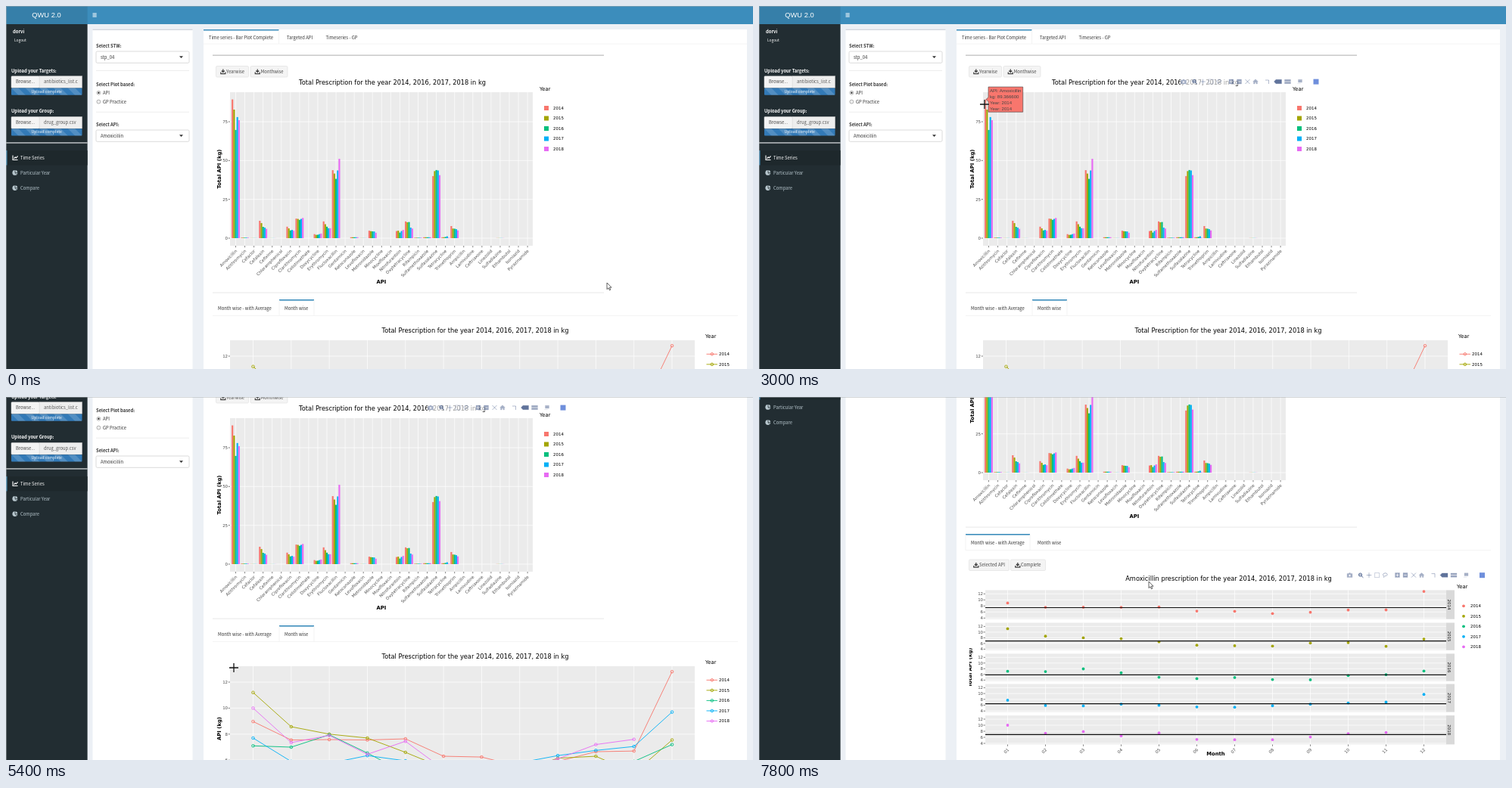
Recreate the animation shown at these times as an HTML page. Size 987x480 px, loop 8000 ms.

```html
<!DOCTYPE html>
<html lang="en">
<head>
<meta charset="utf-8">
<title>Prescription dashboard</title>
<style>
  html, body { margin: 0; width: 100%; height: 100%; overflow: hidden; background: #ecf0f5; }
  svg { display: block; width: 987px; height: 480px; }
  text { font-family: "Noto Sans CJK SC", "Noto Sans CJK JP", "Noto Sans CJK", Lato, sans-serif; white-space: pre; }
  .plot text { font-family: "DejaVu Sans", sans-serif; }
  .arial, .tip text { font-family: "Liberation Sans", sans-serif; }
</style>
</head>
<body>
<svg id="stage" viewBox="0 0 987 480"></svg>
<script>
const stage = document.getElementById('stage');
const YEARS = [2014, 2015, 2016, 2017, 2018];
const COLORS = ['#f8766d', '#a3a500', '#00bf7d', '#00b0f6', '#e76bf3'];
const UI = 5.85, TICK = 5.46, AXIS = 6.82, TITLE = 8.25;
const SIDEBAR = 107.6;

function el(parent, tag, attrs = {}, content) {
  const node = document.createElementNS('http://www.w3.org/2000/svg', tag);
  for (const key in attrs) node.setAttribute(key, attrs[key]);
  if (content !== undefined) node.textContent = content;
  return parent.appendChild(node);
}
const group = (parent, attrs) => el(parent, 'g', attrs);
const rect = (p, x, y, width, height, fill, more) => el(p, 'rect', { x, y, width, height, fill, ...more });
const path = (p, d, stroke, width = 1, more) => el(p, 'path', { d, stroke, 'stroke-width': width, fill: 'none', ...more });
const dot = (p, cx, cy, r, fill, more) => el(p, 'circle', { cx, cy, r, fill, ...more });
// y is the middle of the capitals
const label = (p, x, y, str, size = UI, fill = '#333', more) =>
  el(p, 'text', { x, y: y + size * .36, 'font-size': size, fill, ...more }, str);
const turned = (p, x, y, angle, str, size, fill, more) =>
  label(group(p, { transform: `translate(${x} ${y}) rotate(${angle})` }), 0, 0, str, size, fill, more);
const BOLD = { 'font-weight': 700 }, MID = { 'text-anchor': 'middle' }, END = { 'text-anchor': 'end' };
const BOLD_MID = { ...BOLD, ...MID };

const defs = el(stage, 'defs');
const TILE = 18.7, PERIOD = TILE / Math.SQRT2;
const stripes = el(defs, 'pattern', { id: 'stripes', width: PERIOD, height: PERIOD, patternUnits: 'userSpaceOnUse', patternTransform: 'rotate(-45)' });
rect(stripes, 0, 0, PERIOD, PERIOD, '#337ab7');
rect(stripes, 0, 0, PERIOD / 2, PERIOD, '#528ec2');
rect(el(defs, 'clipPath', { id: 'axisClip' }), 277.8, 440, 20, 240);

rect(stage, 0, 0, 987, 480, '#ecf0f5');
rect(stage, 0, 0, SIDEBAR, 480, '#222d32');
const page = group(stage);

// Header and navigation
rect(page, 0, 0, 987, 24, '#3c8dbc');
rect(page, 0, 0, SIDEBAR, 24, '#367fa9');
label(page, 53.5, 12, 'QWU 2.0', 9.34, '#fff', { ...MID, class: 'arial' });
path(page, 'M114.5 10h5.2M114.5 12h5.2M114.5 14h5.2', '#fff');
label(page, 9, 34, 'dorvi', UI, '#fff', BOLD);
label(page, 11, 45, 'Logout', 4.85, '#fff');

function upload(y, title, file) {
  label(page, 7, y, title, UI, '#fff', BOLD);
  rect(page, 44, y + 7.2, 56.5, 15.6, '#eee', { stroke: '#ccc', 'stroke-width': .5 });
  rect(page, 7, y + 7.2, 37, 15.6, '#f4f4f4', { stroke: '#ddd', 'stroke-width': .5, rx: 1 });
  label(page, 13, y + 14.8, 'Browse...', UI, '#444');
  label(page, 50, y + 14.8, file, UI, '#555');
  const bar = group(page, { transform: `translate(7 ${y + 23 + TILE})` });
  rect(bar, 0, -TILE, 93.5, 9.2, 'url(#stripes)', { rx: 1 });
  label(page, 53.7, y + 27.3, 'Upload complete', 5.05, '#fff', MID);
}
upload(85.5, 'Upload your Targets:', 'antibiotics_list.c');
upload(139.2, 'Upload your Group:', 'drug_group.csv');
rect(page, 0, 180.4, SIDEBAR, 1.1, '#f4f6f7');

rect(page, 0, 191, SIDEBAR, 19.5, '#1e282c');
rect(page, 0, 191, 1.5, 19.5, '#3c8dbc');
path(page, 'M9 197.5v6h6.5M10.5 201.8l1.7-2 1.3 1.2 2-2.6', '#fff', 1.1);
label(page, 19, 200.6, 'Time Series', UI, '#fff');
['Particular Year', 'Compare'].forEach((name, i) => {
  const y = 220.4 + i * 20.2;
  dot(page, 11.8, y, 3.4, '#b8c7ce');
  path(page, `M12 ${y - 3.6}v3.6h3.8M12 ${y}l2.2 2.4`, '#222d32', .7);
  label(page, 19, y, name, UI, '#b8c7ce');
});

// Filter panel
rect(page, 114.5, 30.5, 132, 900, '#fff');
rect(page, 114.5, 30.5, 132, 1.5, '#d2d6de');
function select(y, title, value) {
  label(page, 119, y, title, UI, '#333', BOLD);
  rect(page, 119, y + 7, 123, 15.3, '#fff', { stroke: '#ccc', 'stroke-width': .7, rx: 1.5 });
  label(page, 125, y + 14.6, value);
  el(page, 'path', { d: `M229 ${y + 13.3}h5l-2.5 2.7z`, fill: '#333' });
}
select(53, 'Select STW:', 'stp_04');
select(157, 'Select API:', 'Amoxicillin');
rect(page, 119, 85.2, 123, .7, '#e6e6e6');
rect(page, 119, 139.8, 123, .7, '#e6e6e6');
label(page, 119, 103.5, 'Select Plot based:', UI, '#333', BOLD);
['API', 'GP Practice'].forEach((name, i) => {
  const y = 114.8 + i * 11.8;
  dot(page, 122.4, y, 2.5, i ? '#eee' : '#fff', { stroke: '#888', 'stroke-width': .6 });
  if (!i) dot(page, 122.4, y, 1.2, '#333');
  label(page, 128, y, name);
});

// Content box
rect(page, 261, 31, 718, 900, '#fff');
rect(page, 261, 49.7, 718, .7, '#f0f0f0');
rect(page, 261, 31, 99.5, 1.5, '#3c8dbc');
rect(page, 360, 32, .7, 18, '#eee');
label(page, 268, 41.8, 'Time series - Bar Plot Complete');
label(page, 371, 41.8, 'Targeted API');
label(page, 422.5, 41.8, 'Timeseries - GP');
rect(page, 273, 64.7, 517, .8, '#999');
rect(page, 273, 378.7, 517, .7, '#ddd');

function button(p, x, y, w, name) {
  rect(p, x, y, w, 14.5, '#f4f4f4', { stroke: '#ddd', 'stroke-width': .6, rx: 1.4 });
  path(p, `M${x + 6.3} ${y + 8}v2.2h6v-2.2M${x + 9.3} ${y + 4}v3.5M${x + 7.4} ${y + 6}l1.9 2 1.9-2`, '#444', 1.3);
  label(p, x + 13.6, y + 7.3, name, UI, '#444');
}
button(page, 277.5, 79.5, 43, 'Yearwise');
button(page, 323, 79.5, 49, 'Monthwise');

// Bar chart
const DRUGS = ('Amoxicillin Azithromycin Cefaclor Cefalexin Cefixime Chloramphenicol Ciprofloxacin Clarithromycin ' +
  'Colistimethate Doxycycline Erythromycin Flucloxacillin Gentamicin Ketoconazole Levofloxacin Metronidazole ' +
  'Minocycline Moxifloxacin Nitrofurantoin Oxytetracycline Rifampicin Sulfamethoxazole Sulfasalazine Tetracycline ' +
  'Trimethoprim Ampicillin Lamivudine Ceftriaxone Linezolid Sulfadiazine Ethambutol Isoniazid Pyrazinamide').split(' ');
const same = v => Array(5).fill(v);
const KG = {
  Amoxicillin: [89.37, 82.8, 69.7, 78, 76],
  Azithromycin: same(.35), Cefaclor: same(.08), Cefixime: same(.05),
  Cefalexin: [11.2, 9.7, 7.3, 6.8, 6],
  Ciprofloxacin: [7.4, 6.3, 5, 5.3, 4.8],
  Clarithromycin: [12.6, 12.4, 11.8, 12.4, 13],
  Doxycycline: [2.6, 2.1, 2.2, 2.6, 3],
  Erythromycin: [10.8, 9, 7.4, 6.4, 6.4],
  Flucloxacillin: [43.8, 41.6, 38.2, 43.6, 51.1],
  Ketoconazole: same(.6), Levofloxacin: same(.08),
  Metronidazole: [4.8, 4.5, 4.4, 4.3, 3.5],
  Nitrofurantoin: [4.6, 4.8, 3.6, 4.6, 5.3],
  Oxytetracycline: [10.8, 10.2, 10.4, 6.8, 6.2],
  Rifampicin: same(.3), Sulfamethoxazole: same(.6), Sulfadiazine: same(.08),
  Sulfasalazine: [40, 43.2, 43.9, 43.6, 40.6],
  Tetracycline: [.6, .6, .8, 1.2, .3],
  Trimethoprim: [7.8, 6.2, 6.1, 5.8, 5]
};

function yTick(p, x, y, value, right) {
  path(p, `M${x} ${y}H${right}`, '#fff', .7);
  path(p, `M${x - 2.3} ${y}H${x}`, '#333', .6);
  label(p, x - 2.9, y, value, TICK, '#4d4d4d', END);
}
function xTick(p, x, y, name) {
  path(p, `M${x} ${y}v2.3`, '#333', .6);
  turned(p, x + .7, y + 6, -45, name, TICK, '#4d4d4d', END);
}

const bars = group(page, { class: 'plot' });
rect(bars, 296, 114, 400, 203, '#ebebeb');
const drugX = i => 303.5 + i * 12.05;
const kgY = v => 307 - v * 2.053;
[0, 25, 50, 75].forEach(v => yTick(bars, 296, kgY(v), v, 696));
DRUGS.forEach((name, i) => {
  const x = drugX(i);
  path(bars, `M${x} 114V317`, '#fff', .7);
  xTick(bars, x, 317, name);
  (KG[name] || []).forEach((v, k) => rect(bars, x - 5.4 + k * 2.17, kgY(v), 2.17, v * 2.053, COLORS[k]));
});
label(bars, 510.5, 101, 'Total Prescription for the year 2014, 2016, 2017, 2018 in kg', TITLE, '#000', MID);
label(bars, 496, 365, 'API', AXIS, '#000', BOLD_MID);
turned(bars, 281.8, 215.5, -90, 'Total API (kg)', AXIS, '#000', BOLD_MID);
label(bars, 705, 109.5, 'Year', AXIS, '#000');
YEARS.forEach((year, k) => {
  const y = 135 + k * 13.5;
  rect(bars, 711, y - 3, 6, 6, COLORS[k]);
  label(bars, 723, y, year, TICK, '#000');
});

// Toolbar shown over a hovered plot
function toolbar(x, y) {
  const bar = group(page, { transform: `translate(${x} ${y})` });
  rect(bar, -4, -5, 188, 9.5, '#fff', { opacity: .62 });
  const icon = (dx, d, opacity = .32, filled) => path(bar, d, '#001f5f', filled ? .3 : 1, {
    transform: `translate(${dx} 0)`, opacity, 'fill-rule': 'evenodd', ...(filled && { fill: '#001f5f' })
  });
  icon(.5, 'M-3.5-2h2l.7-1h1.6l.7 1h2v5h-7zM1.3.5a1.3 1.3 0 1 0-2.6 0a1.3 1.3 0 1 0 2.6 0', .35, true);
  icon(15, 'M1.6-.5a2.1 2.1 0 1 0-4.2 0a2.1 2.1 0 1 0 4.2 0M1 1l2.4 2.2M-1.8-.5h2.6', .65);
  icon(26, 'M-3.3 0h6.6M0-3.3v6.6');
  icon(36.6, 'M-3-3h6v6h-6z', .4).setAttribute('stroke-dasharray', '1 1');
  icon(47, 'M-1.5 3.3l.5-1.8C-4-.2-2-3 1-2.7S4 1.3-.5 1.2');
  icon(63.5, 'M-3-3h6v6h-6zM-.5-2v1.5h-1.5v1h1.5v1.5h1v-1.5h1.5v-1h-1.5v-1.5z', .4, true);
  icon(74, 'M-3-3h6v6h-6zM-2-.5v1h4v-1z', .4, true);
  icon(85, 'M-3-3l6 6M3-3l-6 6');
  icon(95.5, 'M-3.5 0L0-3.2 3.5 0h-1v3h-1.7v-2h-1.6v2h-1.7v-3z', .35, true);
  icon(111, 'M-2.5-2h4.5v5', .3);
  icon(125, 'M-5 0l2.5-2.7h7.5v5.4h-7.5z', .62, true);
  icon(138, 'M-4-2.7h8v2.2h-8zM-4 .5h8v2.2h-8z', .4, true);
  icon(154, 'M-2-2.8h5v3.8h-5zM-3.2 2.6h4.5', .35, true);
  rect(bar, 172, -3.4, 7, 7, '#6f8fdc');
  return bar;
}
const barsTools = toolbar(560.5, 100);

// Lower tabs
rect(page, 273, 409.3, 694, .7, '#f0f0f0');
const tabMark = rect(page, 361, 388, 46, 1.6, '#3c8dbc');
const tabSides = path(page, '', '#eee', .7);
label(page, 280, 399.5, 'Month wise - with Average');
label(page, 368, 399.5, 'Month wise');

const MONTHS = Array.from({ length: 12 }, (_, m) => String(m + 1).padStart(2, '0'));
const MONTHLY = [
  [8.97, 7.55, 7.58, 7.55, 7.64, 6.3, 6.24, 5.5, 5.9, 6.65, 6.7, 12.8],
  [11.2, 8.57, 8, 7.7, 6.6, 5.4, 5.2, 5.1, 6.15, 6.3, 5, 7.55],
  [7.1, 7, 7.95, 6.55, 5, 4.5, 4.9, 4.2, 4.1, 5.6, 5.9, 7.2],
  [7.7, 5.9, 5.75, 6.35, 5.95, 5.4, 5.3, 5.8, 6.35, 6.75, 7.05, 9.7],
  [10, 7.35, 7.9, 6.45, 7.45, 5.3, 5.2, 5.2, 6.1, 7.2, 7.6]
];
const mean = list => list.reduce((a, b) => a + b) / list.length;

// Line chart by month
const lines = group(page, { class: 'plot' });
rect(lines, 296, 442, 614, 164, '#ebebeb');
const lineX = m => 326.5 + m * 50.32;
const lineY = v => 463 + (12 - v) * 17.2;
MONTHS.forEach((name, m) => {
  path(lines, `M${lineX(m)} 442V606`, '#fff', .7);
  xTick(lines, lineX(m), 606, name);
});
[4, 6, 8, 10, 12].forEach(v => yTick(lines, 296, lineY(v), v, 910));
MONTHLY.forEach((series, k) => {
  const stroke = COLORS[k], ring = { stroke, 'stroke-width': .9 };
  path(lines, 'M' + series.map((v, m) => `${lineX(m)} ${lineY(v)}`).join('L'), stroke, .9);
  series.forEach((v, m) => dot(lines, lineX(m), lineY(v), 1.8, 'none', ring));
  const y = 460.3 + k * 13.55;
  path(lines, `M925.5 ${y}h14.5`, stroke, .9);
  dot(lines, 932.8, y, 1.8, 'none', ring);
  label(lines, 942, y, YEARS[k], TICK, '#000');
});
label(lines, 620, 428.7, 'Total Prescription for the year 2014, 2016, 2017, 2018 in kg', TITLE, '#000', MID);
label(lines, 603, 621, 'Month', AXIS, '#000', BOLD_MID);
turned(lines, 281.8, 524.5, -90, 'API (kg)', AXIS, '#000', BOLD_MID);
label(lines, 924, 437, 'Year', AXIS, '#000');

// One strip per year with its average
const strips = group(page);
button(strips, 277.5, 422, 53, 'Selected API');
button(strips, 332.5, 422, 46, 'Complete');
const facets = group(strips, { class: 'plot' });
const facetX = m => 328.5 + m * 50;
[[467.3, 4], [510.4, 3.75], [551.3, 3.75], [591.4, 3.85], [633, 4]].forEach(([top, unit], k) => {
  const y = v => top + (12 - v) * unit;
  const start = top - 4.9, height = 8 * unit + 6.3;
  rect(facets, 299, start, 609, height, '#ebebeb');
  rect(facets, 908, start, 11, height, '#d9d9d9');
  MONTHS.forEach((_, m) => path(facets, `M${facetX(m)} ${start}v${height}`, '#fff', .7));
  [4, 6, 8, 10, 12].forEach(v => yTick(facets, 299, y(v), v, 908));
  MONTHLY[k].forEach((v, m) => dot(facets, facetX(m), y(v), 1.9, COLORS[k]));
  path(facets, `M299 ${y(mean(MONTHLY[k]))}H908`, '#111', 1.2);
  turned(facets, 912, start + height / 2, 90, YEARS[k], TICK, '#1a1a1a', MID);
  dot(facets, 931, 483.3 + k * 13.5, 1.9, COLORS[k]);
  label(facets, 940, 483.3 + k * 13.5, YEARS[k], TICK, '#000');
});
MONTHS.forEach((name, m) => xTick(facets, facetX(m), 666.5, name));
label(facets, 620.5, 446.7, 'Amoxicillin prescription for the year 2014, 2016, 2017, 2018 in kg', TITLE, '#000', MID);
label(facets, 603.5, 679, 'Month', AXIS, '#000', BOLD_MID);
turned(group(facets, { 'clip-path': 'url(#axisClip)' }), 278.8, 564.5, -90, 'Total API (kg)', AXIS, '#000', BOLD_MID);
label(facets, 922, 457.2, 'Year', AXIS, '#000');
const stripTools = toolbar(780, 442.6);

// Hover label
const tip = group(page, { class: 'tip' });
el(tip, 'path', { d: 'M300 123.5l3-2.8v-13.7h45.7v33.2h-45.7v-13.9z', fill: '#f8766d', stroke: '#444', 'stroke-width': .6 });
['API: Amoxicillin', 'kg: 89.366600', 'Year: 2014', 'Year: 2014'].forEach((row, i) =>
  label(tip, 305, 111.6 + i * 8.1, row, 6.07, '#444'));

// Fixed browser parts
const EDGE = { opacity: .5 };
rect(stage, 0, 0, 987, 1, '#aaafb2', EDGE);
rect(stage, 0, 1, 1, 479, '#aaafb2', EDGE);
const status = group(stage);
rect(status, 0, 475, 330, 6, '#f4f4f4');
label(status, 2, 480.5, 'Waiting for the chart data of the selected month, please hold on for a moment', UI, '#777');

const arrow = el(stage, 'path', { d: 'M0 0v8.6l2-1.8 1.4 3 1.4-.6-1.4-3h2.6z', fill: '#fff', stroke: '#222', 'stroke-width': .7 });
const cross = group(stage);
path(cross, 'M-6.2 0H6.2M0-6.2V6.2', '#fff', 2.4, { opacity: .6 });
path(cross, 'M-6 0H6M0-6V6', '#111', 1.3);

// Timeline
const LOOP = 8000, STEP = 200;
const POINTER = [
  [0, 794, 366], [200, 794, 366], [400, 720, 325], [800, 400, 185], [1000, 298, 142], [1400, 298, 142],
  [1600, 298, 130], [4800, 298, 130], [5200, 301, 358], [5600, 301, 358],
  [6000, 315, 250], [6400, 315, 250], [6800, 305.5, 333], [7200, 305.5, 333], [7600, 515, 244], [LOOP, 515, 244]
];
const SCROLL = [[0, 0], [5000, 0], [5400, 86], [5600, 130], [5800, 150], [6800, 150], [7000, 190], [7200, 207], [LOOP, 207]];

function at(track, t) {
  const i = Math.max(1, track.findIndex(key => key[0] > t));
  const [a, b] = [track[i - 1], track[i]];
  const f = (t - a[0]) / (b[0] - a[0]);
  return a.slice(1).map((v, k) => v + (b[k + 1] - v) * f);
}
const show = (node, on) => node.setAttribute('display', on ? 'inline' : 'none');

function draw(t) {
  const [scroll] = at(SCROLL, t), [x, y] = at(POINTER, t);
  const averaged = t >= 6400;
  const crossed = t >= 600 && t < 5800;
  page.setAttribute('transform', `translate(0 ${-scroll})`);
  for (const node of [arrow, cross]) node.setAttribute('transform', `translate(${x} ${y})`);
  show(cross, crossed);
  show(arrow, !crossed);
  show(barsTools, t >= 400 && t < 5800);
  show(tip, t >= 1600 && t < 5000);
  show(lines, !averaged);
  show(strips, averaged);
  show(stripTools, t >= 6800);
  stripTools.setAttribute('opacity', t < 7000 ? .18 : 1);
  show(status, t >= 6000 && t < 7000);
  const [left, width] = averaged ? [273, 85] : [361, 46];
  tabMark.setAttribute('x', left);
  tabMark.setAttribute('width', width);
  tabSides.setAttribute('d', `M${left} 389v20.5M${left + width} 389v20.5`);
}

function tick() {
  const t = performance.now() % LOOP;
  draw(Math.floor(t / STEP) * STEP);
  requestAnimationFrame(tick);
}
tick();
</script>
</body>
</html>
```
